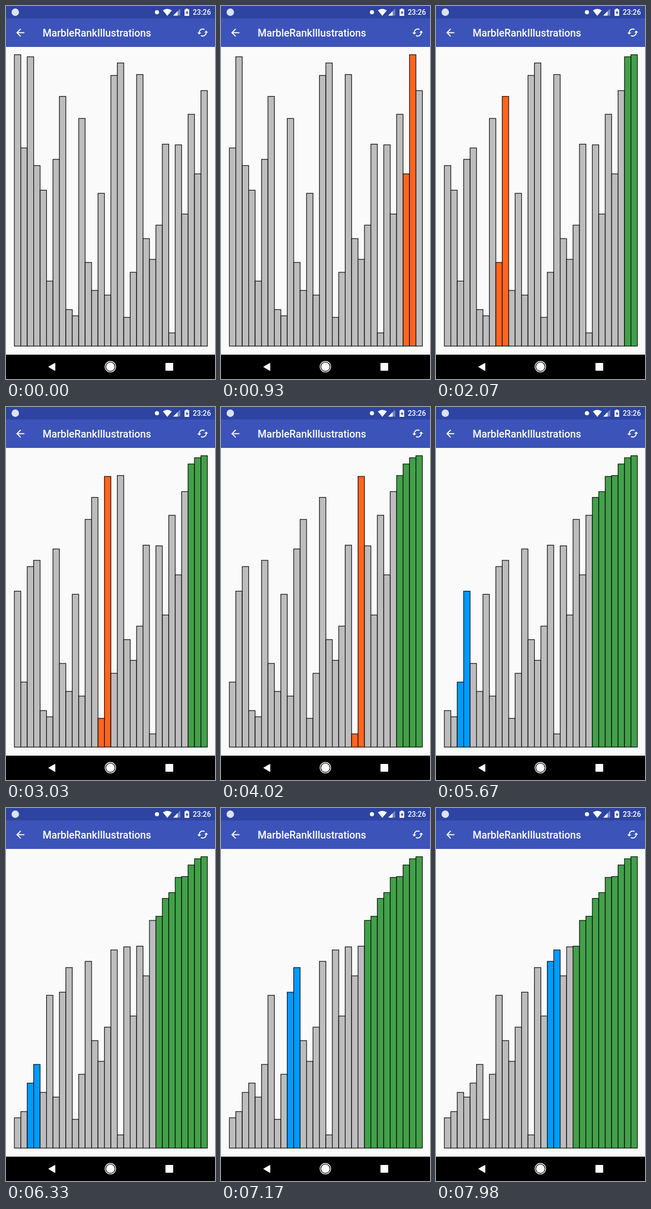
Animation of 405x720 px, one loop 8 s. Source, as an HTML page:

```html
<!DOCTYPE html>
<html lang="en">
<head>
<meta charset="utf-8">
<title>Sorting bars</title>
<style>
  html, body { margin: 0; width: 100%; height: 100%; overflow: hidden; background: #fafafa; }
  svg { display: block; width: 100vw; height: 100vh; }
  text { font-family: Roboto, sans-serif; font-weight: 500; fill: #fff; }
  #bars { stroke: #000; stroke-width: 1.2; }
</style>
</head>
<body>
<svg viewBox="0 0 405 720">
  <rect width="405" height="720" fill="#fafafa"/>

  <!-- Status bar -->
  <rect width="405" height="24" fill="#2d44a2"/>
  <g fill="#fff">
    <circle cx="18" cy="12" r="7.2" fill="#dce2f4"/>
    <circle cx="292.5" cy="12" r="4"/>
    <path d="M304 8.6Q312.5 2.4 321.300 8.600L312.600 19Z"/>
    <path d="M337.500 5V18.500H324Z" opacity=".35"/>
    <path d="M332.500 10V18.500H324Z"/>
    <path d="M348.500 6.500V5h4v1.500h2.500V19h-9V6.500Z"/>
    <path d="M351.500 8.500l-3.500 5h2.200v3.500l3.300-5h-2Z" fill="#2d44a2"/>
    <text x="362" y="17" font-size="13.8">23:26</text>
  </g>

  <!-- Toolbar -->
  <rect y="24" width="405" height="55" fill="#3c54b9"/>
  <g fill="#fff">
    <path transform="translate(16 39.700) scale(.98)" d="M20 11H7.830l5.590-5.590L12 4l-8 8 8 8 1.410-1.410L7.830 13H20z"/>
    <text x="71" y="58.800" font-size="19.700">MarbleRankIllustrations</text>
    <path transform="translate(369.700 39.700) scale(.96)" d="M19 8l-4 4h3c0 3.310-2.690 6-6 6-1.010 0-1.970-.25-2.800-.7l-1.460 1.460C8.970 19.540 10.430 20 12 20c4.420 0 8-3.580 8-8h3zM6 12c0-3.310 2.690-6 6-6 1.010 0 1.970.25 2.800.7l1.460-1.460C15.030 4.460 13.570 4 12 4c-4.420 0-8 3.580-8 8H1l4 4 4-4z"/>
  </g>

  <g id="bars"></g>

  <!-- Navigation bar -->
  <rect y="673" width="405" height="47"/>
  <g fill="#fff">
    <path d="M82.500 696.500L95 689.500V704Z" stroke="#fff" stroke-linejoin="round"/>
    <circle cx="202.300" cy="696.300" r="8.300"/>
    <circle cx="202.300" cy="696.300" r="10.300" fill="none" stroke="#fff" stroke-width="1.400"/>
    <rect x="309" y="689" width="15" height="15" rx="1"/>
  </g>
</svg>
<script>
  const LOOP = 8000, STEP = 30;
  const START_TICK = 4, PAUSE_TICK = 122;
  const LEFT = 16.2, PITCH = 12.467, BASE = 656.5;
  const COLORS = { idle: '#bdbdbd', swapped: '#ff651f', kept: '#009cff', sorted: '#43a04a' };

  // Top edge of each bar before sorting; a smaller value is a taller bar.
  const initialTops = [
    94, 274, 98, 308, 355.5, 531, 296, 174.5, 586, 598,
    217, 495, 549, 361.5, 558, 134, 110, 601, 514, 132.3,
    449, 489, 423, 266.7, 631, 268, 401.5, 209, 324, 163.3
  ];

  const group = document.getElementById('bars');
  const bars = initialTops.map((_, i) => {
    const bar = document.createElementNS('http://www.w3.org/2000/svg', 'rect');
    bar.setAttribute('x', LEFT + i * PITCH);
    bar.setAttribute('width', PITCH);
    return group.appendChild(bar);
  });

  // Bubble sort run for a given number of comparisons.
  function sortState(comparisons) {
    const tops = [...initialTops];
    let end = tops.length - 1, active = -1, swapped = false, next = 0;
    for (let n = 0; n < comparisons; n++) {
      if (next === end) { end--; next = 0; }
      active = next++;
      swapped = tops[active] < tops[active + 1];
      if (swapped) [tops[active], tops[active + 1]] = [tops[active + 1], tops[active]];
    }
    return { tops, end, active, swapped };
  }

  function render(time) {
    const tick = Math.floor(time / STEP);
    const pause = tick >= PAUSE_TICK ? 1 : 0;
    const { tops, end, active, swapped } = sortState(Math.max(0, tick - START_TICK + 1 - pause));
    bars.forEach((bar, i) => {
      const isActive = active >= 0 && (i === active || i === active + 1);
      const state = isActive ? (swapped ? 'swapped' : 'kept') : i > end ? 'sorted' : 'idle';
      bar.setAttribute('y', tops[i]);
      bar.setAttribute('height', BASE - tops[i]);
      bar.setAttribute('fill', COLORS[state]);
    });
  }

  const startTime = performance.now();
  function frame() {
    render((performance.now() - startTime) % LOOP);
    requestAnimationFrame(frame);
  }
  frame();
</script>
</body>
</html>
```
